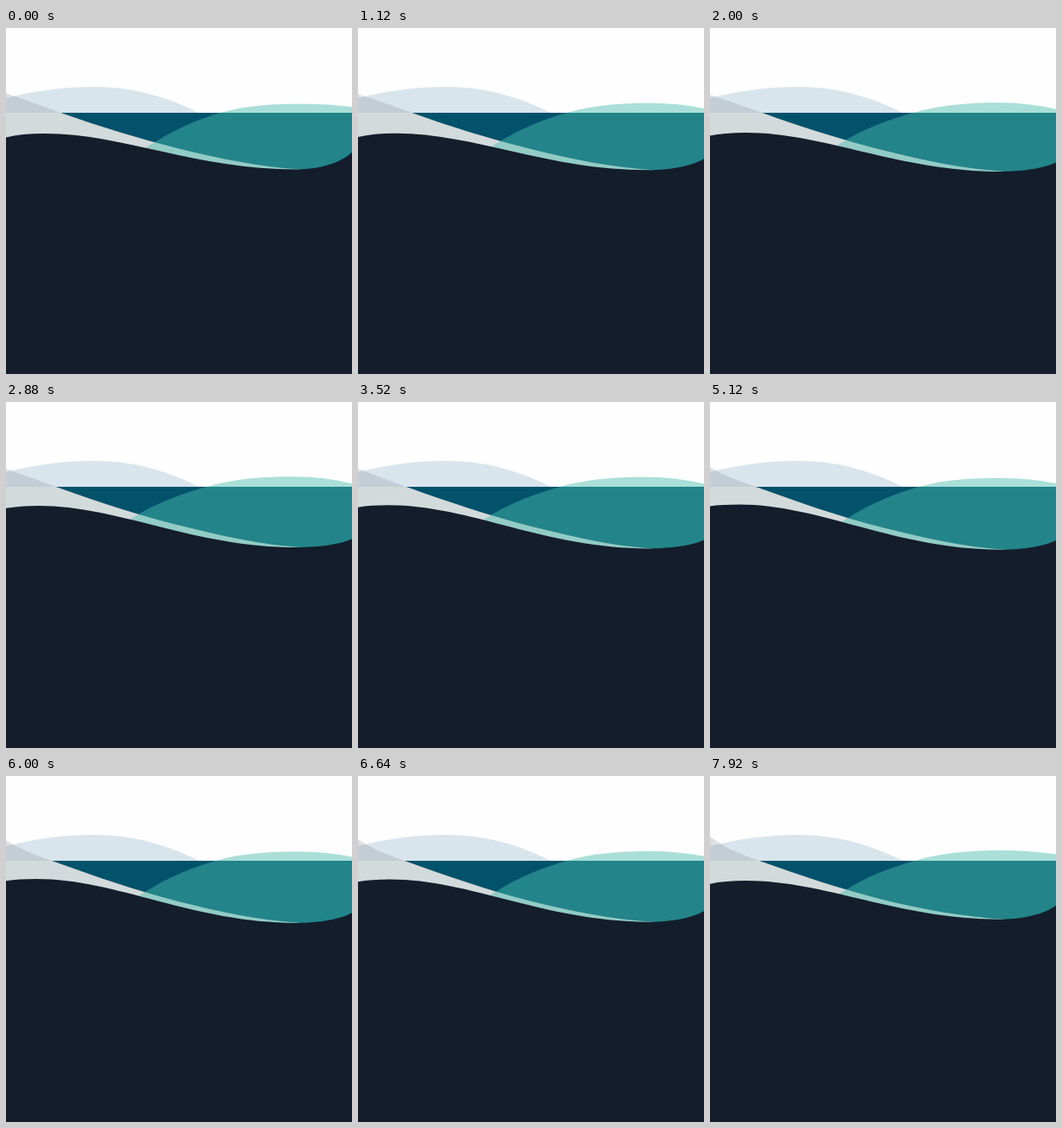
An HTML page for the animation above (8 s loop, 400 by 400 pixels).

```html
<!DOCTYPE html>
<html lang="en">
<head>
<meta charset="utf-8">
<title>Waves</title>
<style>
  html, body { margin: 0; width: 100%; height: 100%; overflow: hidden; background: #fefefe; }
  svg { display: block; width: 100vw; height: 100vh; }
</style>
</head>
<body>
<svg viewBox="0 0 400 400">
  <defs>
    <clipPath id="above"><rect width="400" height="98"/></clipPath>
    <clipPath id="below"><rect y="98" width="400" height="302"/></clipPath>
  </defs>
  <path id="hill" fill="#d9e5ec" clip-path="url(#above)"/>
  <path class="foam" fill="rgba(130,140,150,.27)" clip-path="url(#above)"/>
  <rect y="98" width="400" height="302" fill="#02526c"/>
  <path class="foam" fill="#d2dadb" clip-path="url(#below)"/>
  <path id="swell" fill="rgba(74,187,172,.47)"/>
  <path id="deep" fill="#141d2b"/>
</svg>
<script>
const LOOP = 8000, STEP = 80;

const mix = (a, b, u) => a + (b - a) * u;

// Rises from 0 to 1 and falls back; highest at `peak` seconds.
const tide = (s, peak, period) => .5 + .5 * Math.cos(2 * Math.PI * (s - peak) / period);

// Parabola with its top at `peak` seconds.
const arc = (s, peak, top, bend) => top - bend * (s - peak) ** 2;

// Smooth curve through [x, y, slope] points.
function curve(points) {
  let d = `${points[0][0]},${points[0][1]}`;
  for (let i = 1; i < points.length; i++) {
    const [x0, y0, m0] = points[i - 1], [x1, y1, m1] = points[i];
    const h = (x1 - x0) / 3;
    d += `C${x0 + h},${y0 + m0 * h} ${x1 - h},${y1 - m1 * h} ${x1},${y1}`;
  }
  return d;
}

const setPath = (el, d) => el.setAttribute("d", d);
const hill = document.getElementById("hill");
const swell = document.getElementById("swell");
const deep = document.getElementById("deep");
const foam = document.querySelectorAll(".foam");

setPath(hill, `M${curve([[0, 81, -.25], [103, 68, 0], [222, 97.5, .5]])}V110H0Z`);

const TROUGH_X = 336;

function drawDeep(s, troughY) {
  const u = tide(s, 4.9, 9.5);
  const left = mix(126.5, 120.5, u), right = arc(s, 4.4, 160.2, .86);
  const crestX = mix(45, 34, u), crestY = mix(122, 118.6, u);
  const span = TROUGH_X - crestX, run = 400 - TROUGH_X;
  setPath(deep, `M0,${left}Q${crestX * .4},${crestY} ${crestX},${crestY}`
    + `C${crestX + span * .31},${crestY} ${TROUGH_X - span * .4},${troughY} ${TROUGH_X},${troughY}`
    + `C${TROUGH_X + run * .43},${troughY} ${400 - run * .18},${mix(right, troughY, .58)} 400,${right}`
    + "V400H0Z");
}

function drawFoam(s, troughY) {
  const u = tide(s, 5.5, 11);
  const left = arc(s, 2.7, 77.3, .28);
  const x = mix(60.5, 50, u), midY = mix(139.5, 145.3, u);
  const d = `M${curve([
    [0, left, 3 * (97 - left) / x - .72], [x, 97, .36],
    [200, midY, .25], [TROUGH_X + 5, troughY, .06]
  ])}V400H0Z`;
  foam.forEach(el => setPath(el, d));
}

function drawSwell(s) {
  const sway = Math.cos(2 * Math.PI * s / 5.9) * Math.exp(-s / 7);
  const x = 153.5 + 13.5 * sway;
  const peakX = 337 + 5 * sway;
  const peakY = mix(87.9, 86.1, tide(s, 2.3, 5.8));
  const right = arc(s, 3.8, 94.6, .24);
  setPath(swell, `M${x - 10},400V141.5L${curve([
    [x, 135, -.64], [240 + 9.5 * sway, 97.5, -.28],
    [peakX, peakY, 0], [400, right, 2 * (right - peakY) / (400 - peakX)]
  ])}V400Z`);
}

function render(s) {
  const troughY = mix(163.5, 170.8, tide(s, 4.9, 9.5));
  drawDeep(s, troughY);
  drawFoam(s, troughY);
  drawSwell(s);
}

const start = performance.now();
function tick() {
  const t = (performance.now() - start) % LOOP;
  render(Math.floor(t / STEP) * STEP / 1000);
  requestAnimationFrame(tick);
}
tick();
</script>
</body>
</html>
```
